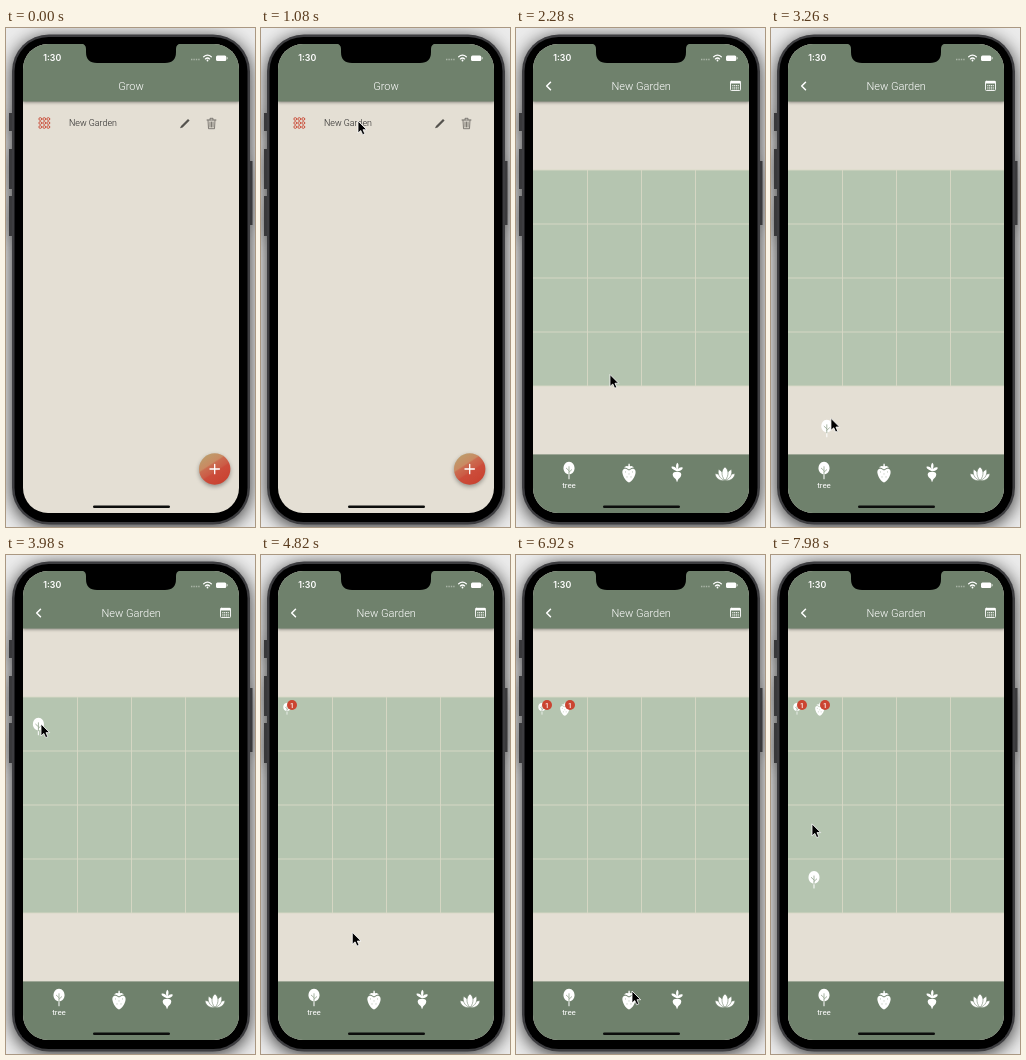
An HTML page for the animation above (8 s loop, 249 by 499 pixels).

```html
<!DOCTYPE html>
<html lang="en">
<head>
<meta charset="utf-8">
<title>Garden planner</title>
<style>
html, body { margin: 0; width: 100%; height: 100%; overflow: hidden; background: #ececec; }
svg { display: block; width: 249px; height: 499px; }
text { font-family: Roboto, sans-serif; fill: #fff; }
.title { font-size: 11px; font-weight: 300; text-anchor: middle; }
.line { fill: none; stroke-linecap: round; stroke-linejoin: round; }
.phone { filter: drop-shadow(0 3px 9px rgba(0, 0, 0, .8)); }
.bar { filter: drop-shadow(0 1px 1.5px rgba(0, 0, 0, .4)); }
.fab { filter: drop-shadow(0 2px 2px rgba(0, 0, 0, .35)); }
</style>
</head>
<body>
<svg viewBox="0 0 249 499">
  <defs>
    <clipPath id="screen"><rect x="17" y="16" width="216" height="469" rx="25"/></clipPath>
    <linearGradient id="fabFill" x1="0.1" y1="0" x2="0.75" y2="1">
      <stop offset="0" stop-color="#b9a26f"/>
      <stop offset=".36" stop-color="#c98a62"/>
      <stop offset=".4" stop-color="#cb6c50"/>
      <stop offset=".58" stop-color="#cb5b45"/>
      <stop offset=".62" stop-color="#cc4d3b"/>
      <stop offset="1" stop-color="#c9412f"/>
    </linearGradient>
    <g id="tree">
      <path d="M0-9C3.500-9 5.500-5.800 5.500-2.500S3.300 3.500 0 3.500-5.500.8-5.500-2.500-3.500-9 0-9Z" fill="#fff"/>
      <path class="line" d="M0 3V8" stroke="#fff" stroke-width="1.200" opacity=".85"/>
      <path class="line" d="M0 4V-4M0 1.500 2.700-1M0 0-2.700-2.500" stroke="#93a48e" stroke-width=".8"/>
    </g>
    <g id="strawberry" fill="#fff">
      <path d="M0-2.800 3-4.500C6-5 7-2.500 6.500 0 5.800 4 2.800 8.500 0 9.300-2.800 8.500-5.800 4-6.500 0-7-2.500-6-5-3-4.500Z"/>
      <path d="M-5-6-2.500-7.300-.7-7-.5-9.500H.7L.9-7 2.500-7.300 5-6 2.500-5.300 0-3.800-2.500-5.300Z"/>
      <path class="line" d="M-3.500-1.500v.3M0 .5v.3M3.500-1.500v.3M-2 3.500v.3M2 3.500v.3" stroke="#a9b8a4" stroke-width=".8"/>
    </g>
    <g id="radish" fill="#fff">
      <path d="M0-1.300C-2-3-5.500-3-5.500-6-3-6.700-1-5-.4-3.500-1.500-6-1-9 .5-10 2.200-8 1.500-5.500.7-3.500 2-5 4-6 5.800-5 5.500-2.500 3-2 0-1.300Z"/>
      <path d="M0-.6C3.500-1.500 5 .8 4 3.200 3 5.500 1 5.500.4 9H-.3C-.6 5.500-3 5.500-4 3.200-5 .8-3.500-1.500 0-.6Z"/>
    </g>
    <g id="lotus" fill="#fff" stroke="#6f816c" stroke-width=".6">
      <path d="M0 7C-6 8-9.500 4-10 .3-6-.3-2 3 0 7 2 3 6-.3 10 .3 9.500 4 6 8 0 7Z"/>
      <path d="M0 7C-6 5-7.500 0-6.500-4-3-3 0 2 0 7 0 2 3-3 6.500-4 7.500 0 6 5 0 7Z"/>
      <path d="M0 7C-4.500 2-3.500-4 0-6.500 3.500-4 4.500 2 0 7Z"/>
    </g>
    <g id="badge">
      <circle r="5" fill="#cb4431"/>
      <text y="2.500" font-size="7" font-weight="500" text-anchor="middle">1</text>
    </g>
  </defs>

  <g class="phone">
    <path d="M3 85h4v18H3zM3 121h4v40H3zM3 168h4v40H3zM243 133h3.500v64H243z" fill="#39393b"/>
    <rect x="6" y="6.500" width="238" height="490" rx="37" fill="#3d3d40"/>
  </g>
  <rect x="8.500" y="9" width="233" height="485" rx="34" fill="#000"/>

  <g clip-path="url(#screen)">
    <g id="listPage">
      <rect x="17" y="16" width="216" height="470" fill="#e4dfd4"/>
      <rect class="bar" x="17" y="10" width="216" height="63.500" fill="#6f816c"/>
      <text class="title" x="125" y="62">Grow</text>
      <g id="gardenIcon" class="line" stroke="#cc5844" stroke-width="1"></g>
      <text x="63" y="98.300" font-size="8.900" font-weight="300" style="fill:#222">New Garden</text>
      <path d="M174 100.300 175 97.900 182 90.900 183.600 92.500 176.600 99.500Z" fill="#55534e"/>
      <path class="line" d="M201 92h9M204 92v-1.700h3V92M202 92l.5 8.700h6l.5-8.700M204 94v5M205.500 94v5M207 94v5" stroke="#66635d" stroke-width=".8"/>
      <circle class="fab" cx="208.700" cy="441" r="15.700" fill="url(#fabFill)"/>
      <path class="line" d="M204 441h9.400M208.700 436.300v9.400" stroke="#fff" stroke-width="1.300"/>
    </g>
    <g id="gardenPage">
      <rect x="17" y="16" width="216" height="470" fill="#e4dfd4"/>
      <rect class="bar" x="17" y="10" width="216" height="63.500" fill="#6f816c"/>
      <text class="title" x="125.200" y="62">New Garden</text>
      <path class="line" d="M34.500 54.300 30.700 58 34.500 61.700" stroke="#fff" stroke-width="1.500"/>
      <rect x="214.500" y="53.300" width="10" height="9.200" rx="1" class="line" stroke="#fff" stroke-width=".9"/>
      <path d="M214.500 53h10v2.500h-10z" fill="#fff"/>
      <path d="M216.300 57.500h7M216.300 59.200h7M216.300 60.900h7" stroke="#fff" stroke-width=".9" stroke-dasharray="1.100 .7"/>
      <rect x="17" y="142" width="216" height="216" fill="#b5c5b0"/>
      <path d="M17 142H233M17 196H233M17 250H233M17 304H233M17 358H233M71.500 142V358M125.500 142V358M179.500 142V358" stroke="#d9d8c6" stroke-width=".9"/>
      <rect x="17" y="426.400" width="216" height="60" fill="#6f816c"/>
      <use href="#tree" x="53" y="442.700"/>
      <text x="53" y="459.500" font-size="8" text-anchor="middle">tree</text>
      <use href="#strawberry" x="113" y="445.300"/>
      <use href="#radish" x="161" y="444.700"/>
      <use href="#lotus" x="209" y="445.500"/>
      <g id="plantedTree">
        <use href="#tree" transform="translate(26 153.800) scale(.68)"/>
        <use href="#badge" x="31" y="150"/>
      </g>
      <g id="plantedBerry">
        <use href="#strawberry" transform="translate(48.800 154.300) scale(.7)"/>
        <use href="#badge" x="54" y="150"/>
      </g>
    </g>
    <text x="37.300" y="33.300" font-size="8.800" font-weight="600" style="font-family:Inter,sans-serif">1:30</text>
    <path d="M185 31.500h9" stroke="#a9b4a6" stroke-width="1.300" stroke-dasharray="1.400 1"/>
    <path class="line" d="M197.700 28.800Q201.500 25.500 205.300 28.800M199.400 30.900Q201.500 29.100 203.600 30.900" stroke="#fff" stroke-width="1.300"/>
    <circle cx="201.500" cy="32.500" r=".9" fill="#fff"/>
    <rect x="210" y="27.500" width="10.300" height="5.400" rx="1.500" fill="#fff"/>
    <path d="M221.200 29.200v2" stroke="#d5dbd3"/>
    <rect x="87" y="477.400" width="77" height="2.700" rx="1.350" fill="#0c0d0c"/>
  </g>
  <path d="M75 15.500Q80 16 80 21V24Q80 35 91 35H159Q170 35 170 24V21Q170 16 175 15.500Z" fill="#000"/>

  <use id="dragged"/>
  <path id="cursor" d="M0 0V12L2.800 9.500 4.700 13.700 6.800 12.800 5 8.700H8.700Z" fill="#000" stroke="#fff" stroke-width=".8" stroke-linejoin="round"/>
</svg>
<script>
const LOOP = 8000, LAG = 45;
const $ = id => document.getElementById(id);

// Pointer waypoints: time, x, y
const route = [
  [340, 187, 366], [680, 150, 170], [900, 110, 80], [1080, 97, 93],
  [2040, 97, 93], [2280, 94, 346], [2500, 78, 420], [2840, 56.5, 445],
  [2960, 56.5, 445], [3400, 61, 350], [3680, 54, 244], [3980, 35, 169], [4120, 35, 163],
  [4280, 35, 163], [4640, 72, 310], [5060, 107, 430],
  [5400, 107, 430], [5635, 72, 210], [5680, 71, 206], [5860, 36, 161], [6000, 38, 158],
  [6160, 38, 158], [6520, 76, 310], [6920, 116, 436],
  [7020, 116, 436], [7400, 51, 440], [7650, 51, 439],
  [7840, 46, 400], [7930, 41, 328], [7980, 41, 270], [8000, 41, 250]
];

// dx, dy: offset from the pointer to the icon centre
const drags = [
  { icon: "tree", from: 2960, to: 4280, dx: -3.5, dy: -2.3 },
  { icon: "strawberry", from: 5400, to: 6160, dx: 6, dy: 15.3 },
  { icon: "tree", from: 7650, to: LOOP, dx: 2, dy: 3 }
];

const slope = (i, axis) => {
  const a = route[i], b = route[i + 1];
  return a && b ? (b[axis] - a[axis]) / (b[0] - a[0]) : 0;
};

// Monotone tangents keep the pointer from overshooting its stops
const tangent = (i, axis) => {
  const a = slope(i - 1, axis), b = slope(i, axis);
  return a * b > 0 ? 2 * a * b / (a + b) : 0;
};

function pointer(time) {
  const next = route.findIndex(stop => stop[0] > time);
  if (next <= 0) return route[0].slice(1);
  const i = next - 1, a = route[i], b = route[next];
  const span = b[0] - a[0], u = (time - a[0]) / span;
  return [1, 2].map(axis =>
    a[axis] * (1 + 2 * u) * (1 - u) ** 2 + b[axis] * u * u * (3 - 2 * u) +
    span * u * (1 - u) * (tangent(i, axis) * (1 - u) - tangent(next, axis) * u));
}

const show = (id, visible) => $(id).setAttribute("visibility", visible ? "inherit" : "hidden");
const move = (id, x, y) => $(id).setAttribute("transform", `translate(${x} ${y})`);

function draw(time) {
  const p = Math.min(1, Math.max(0, (time - 1200) / 540));
  const slide = 1 - (1 - p) ** 3.5;
  move("listPage", -72 * slide, 0);
  move("gardenPage", 216 * (1 - slide), 0);
  show("listPage", p < 1);
  show("gardenPage", p > 0);
  show("plantedTree", time >= 4280);
  show("plantedBerry", time >= 6160);

  show("cursor", time >= 340);
  move("cursor", ...pointer(time));

  const drag = drags.find(d => time >= d.from && time < d.to);
  show("dragged", drag);
  if (drag) {
    const [x, y] = pointer(Math.max(drag.from, time - LAG));
    $("dragged").setAttribute("href", "#" + drag.icon);
    move("dragged", x + drag.dx, y + drag.dy);
  }
}

for (let i = 0; i < 9; i++) {
  const ring = document.createElementNS("http://www.w3.org/2000/svg", "circle");
  ring.setAttribute("cx", 34.3 + i % 3 * 4);
  ring.setAttribute("cy", 91 + Math.floor(i / 3) * 4);
  ring.setAttribute("r", 1.4);
  $("gardenIcon").append(ring);
}

const start = performance.now();
function tick() {
  draw((performance.now() - start) % LOOP);
  requestAnimationFrame(tick);
}
tick();
</script>
</body>
</html>
```
